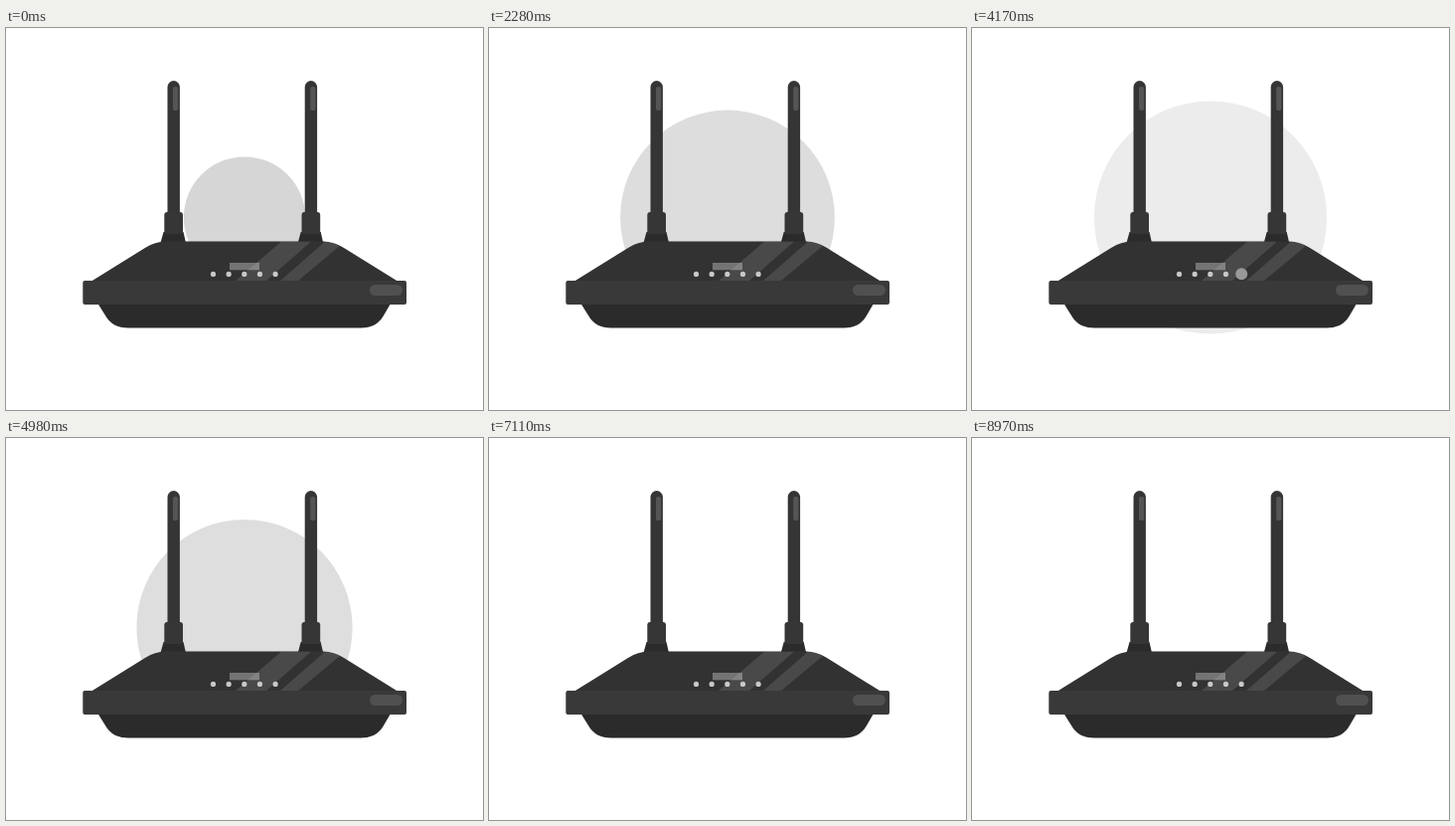
Recreate the animation shown at these times as an HTML page. Size 480 px wide and 384 px high, loop 9000 ms.

```html
<!DOCTYPE html>
<html lang="en">
<head>
<meta charset="utf-8">
<title>Router signal</title>
<style>
  html, body { margin: 0; width: 100%; height: 100%; overflow: hidden; background: #fff; }
  svg { display: block; width: 100vw; height: 100vh; }
</style>
</head>
<body>
<svg viewBox="0 0 480 384">
  <defs>
    <g id="antenna">
      <path d="M162.5 188V59.3a6.2 6.2 0 0 1 12.4 0V188Z" fill="#353535"/>
      <rect x="168" y="59" width="5.2" height="24" rx="2" fill="#555"/>
      <path d="M158.5 205h20l2.5 11h-25.500Z" fill="#2b2b2b"/>
      <path d="M159.300 207V188q0-3 3-3h12.700q3 0 3 3V207Z" fill="#363636"/>
    </g>
  </defs>
  <circle id="wave" cx="240" cy="190.5" fill="#000"/>
  <use href="#antenna"/>
  <use href="#antenna" x="138.200"/>
  <path d="M92.500 277H387l-7 12q-7 12.500-23 12.500H123q-16 0-23-12.500Z" fill="#2b2b2b"/>
  <path d="M86 254.500 140 221q10-6.500 21-6.500H319q11 0 21 6.500L394 254.500Z" fill="#323232"/>
  <rect x="77.300" y="254" width="325.700" height="24" rx="2" fill="#393939"/>
  <rect x="366" y="258" width="33" height="11" rx="5.500" fill="#505050"/>
  <rect x="225" y="236" width="30" height="7.300" fill="#747474"/>
  <path d="M277 214.800h30L262 254H231ZM321 214.700q8 .3 15 4.300L294 254H276Z" fill="#fff" opacity=".11"/>
  <g id="leds" fill="#c8c8c8"></g>
  <circle id="halo" cx="271.200" cy="247.300" fill="#999"/>
</svg>
<script>
  const LOOP = 9000;
  const PULSE = 897.5;
  const FADE = [[0, .16], [107, .188], [487, .135], [620, .05], [700, 0]];
  const GLOW = [[510, 0], [570, 1], [630, 1], [690, 0]];

  const byId = id => document.getElementById(id);
  const wave = byId('wave'), halo = byId('halo'), leds = byId('leds');

  for (let i = 0; i < 5; i++) {
    const led = document.createElementNS('http://www.w3.org/2000/svg', 'circle');
    led.setAttribute('cx', 208.5 + i * 15.65);
    led.setAttribute('cy', 247.4);
    led.setAttribute('r', 2.6);
    leds.append(led);
  }

  // Linear interpolation through [time, value] points, held at both ends.
  function track(points, t) {
    if (t <= points[0][0]) return points[0][1];
    for (let i = 1; i < points.length; i++) {
      const [t0, v0] = points[i - 1], [t1, v1] = points[i];
      if (t < t1) return v0 + (v1 - v0) * (t - t0) / (t1 - t0);
    }
    return points[points.length - 1][1];
  }

  function render(time) {
    const phase = (time % LOOP) % PULSE;
    wave.setAttribute('r', 61 + phase * .0965);
    wave.setAttribute('opacity', track(FADE, phase));

    const glow = track(GLOW, phase);
    halo.setAttribute('r', 2.6 + 3.4 * glow);
    halo.setAttribute('opacity', glow);
  }

  const start = performance.now();
  function tick() {
    render(performance.now() - start);
    requestAnimationFrame(tick);
  }
  tick();
</script>
</body>
</html>
```
